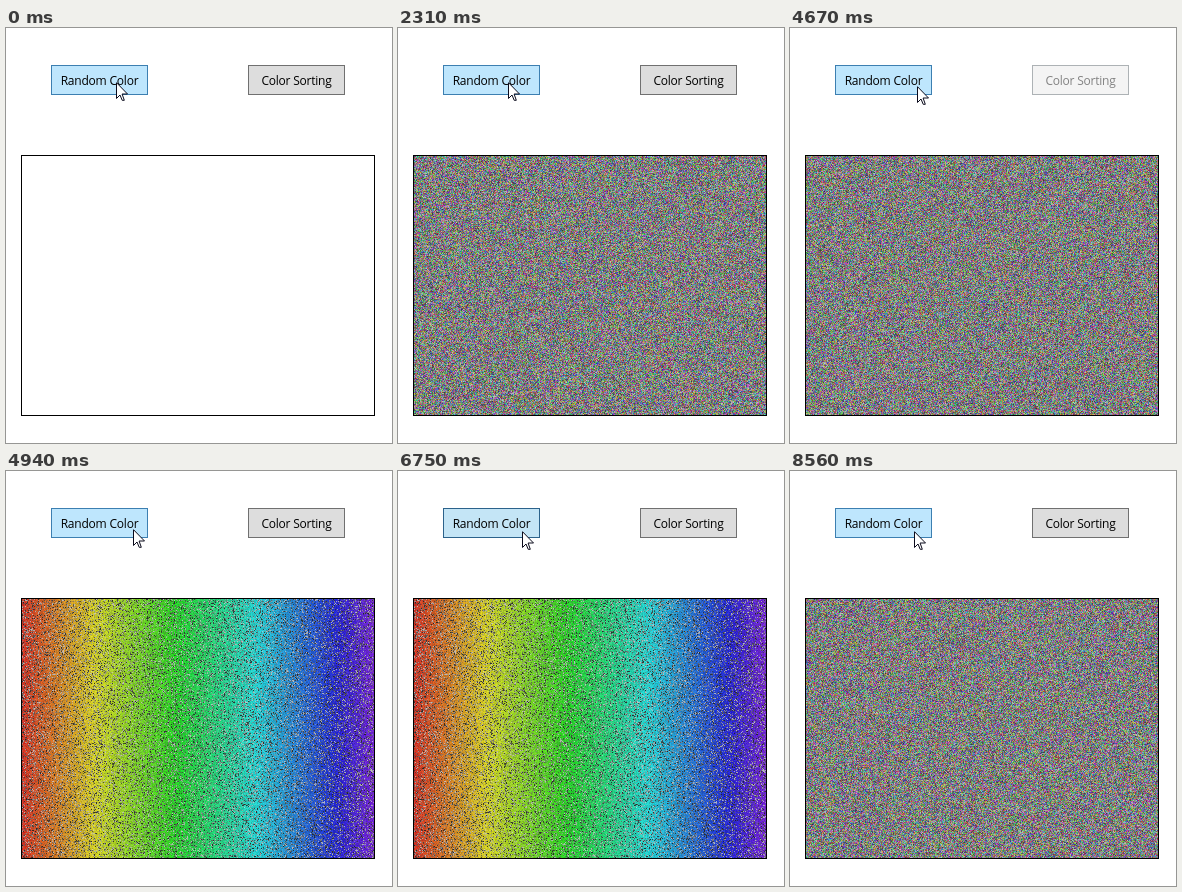
Animation, 386 px wide and 415 px high, one loop 9.09 s. Source, as an HTML page with a canvas:

```html
<!DOCTYPE html>
<html lang="en">
<head>
<meta charset="utf-8">
<title>Color sorting</title>
<style>
  html, body { margin: 0; width: 100%; height: 100%; overflow: hidden; background: #fff; }
  .stage { position: relative; width: 386px; height: 415px; overflow: hidden; }
  .stage > * { position: absolute; box-sizing: border-box; }
  .button {
    top: 37px; width: 97px; height: 30px;
    border: 1px solid #707070; background: #ddd; color: #000;
    font: 12px/29px "Open Sans", "Noto Sans", sans-serif; letter-spacing: -.22px;
    text-align: center; white-space: nowrap;
  }
  .hover { background: #bee6fd; border-color: #3c7fb1; }
  .pressed { background: #c4e5f6; border-color: #2c628b; }
  .disabled { background: #f4f4f4; border-color: #adb2b5; color: #838383; }
  #random { left: 45px; }
  #sort { left: 242px; }
  .frame { left: 15px; top: 127px; width: 354px; height: 261px; border: 1px solid #000; }
  canvas { left: 16px; top: 128px; }
  #pointer { left: 0; top: 0; width: 14px; height: 21px; }
</style>
</head>
<body>
<div class="stage">
  <div class="button" id="random">Random Color</div>
  <div class="button" id="sort">Color Sorting</div>
  <div class="frame"></div>
  <canvas id="picture" width="352" height="259"></canvas>
  <svg id="pointer" viewBox="0 0 14 21">
    <path d="M.5.7v15.8L4 13l2.2 5.3h2.1L6.1 12h5.4z" fill="#fff" stroke="#0b0b1c"/>
  </svg>
</div>
<script>
const LOOP = 9090;
const $ = id => document.getElementById(id);
const canvas = $('picture'), ctx = canvas.getContext('2d');

// Each row: start time, blank, sorted or a noise seed
const pictureSteps = [[0, 'blank'], [1050, 11], [2310, 23], [3460, 37],
  [4940, 'sorted'], [7430, 53], [8560, 71]];

// Each row: press, start of work, end of work
const clicks = {
  random: [[330, 460, 1050], [1640, 1710, 2310], [2700, 2770, 3460],
    [6690, 6820, 7430], [7830, 7970, 8560]],
  sort: [[3860, 3990, 4940]]
};

// Each row: first step, last step, step count, goal
const moves = [
  [2970, 3240, 5, 274, 53],
  [4190, 4670, 7, 127, 58],
  [5400, 5810, 6, 304, 57],
  [6070, 6600, 8, 124, 60]
];
const home = [110, 54];

function seeded(seed) {
  return () => {
    seed = (seed + 0x6D2B79F5) | 0;
    let n = Math.imul(seed ^ (seed >>> 15), 1 | seed);
    n = (n + Math.imul(n ^ (n >>> 7), 61 | n)) ^ n;
    return ((n ^ (n >>> 14)) >>> 0) / 4294967296;
  };
}

function hsl(hue, sat, light) {
  const reach = sat * Math.min(light, 1 - light);
  return [0, 8, 4].map(n => {
    const k = (n + hue / 30) % 12;
    return 255 * (light - reach * Math.max(-1, Math.min(k - 3, 9 - k, 1)));
  });
}

function paint(colorAt) {
  const image = ctx.createImageData(canvas.width, canvas.height);
  for (let i = 0; i < image.data.length; i += 4) {
    image.data.set([...colorAt((i / 4) % canvas.width), 255], i);
  }
  return image;
}

function noise(seed) {
  const rnd = seeded(seed);
  const channel = () => 48 + rnd() * 156;
  return paint(() => [channel(), channel(), channel()]);
}

function sorted() {
  const rnd = seeded(5);
  const speckle = Array.from({ length: canvas.width }, () => 0.22 + rnd() * 0.22);
  return paint(x => {
    const hue = 5 + 263 * x / canvas.width + (rnd() - 0.5) * 8;
    return rnd() < speckle[x]
      ? hsl(hue, rnd() * 0.35, 0.15 + rnd() * 0.6)
      : hsl(hue, 0.6 + rnd() * 0.2, 0.42 + rnd() * 0.12);
  });
}

const images = {};
for (const [, name] of pictureSteps) {
  images[name] = name === 'blank' ? paint(() => [255, 255, 255])
    : name === 'sorted' ? sorted() : noise(name);
}

function pointerAt(t) {
  let [x, y] = home;
  for (const [from, to, count, goalX, goalY] of moves) {
    if (t < from) break;
    const step = Math.min(count, 1 + Math.floor((t - from) * (count - 1) / (to - from) + 1e-6));
    const p = step / count, ease = p * p * (3 - 2 * p);
    x += (goalX - x) * ease;
    y += (goalY - y) * ease;
  }
  return [Math.round(x), Math.round(y)];
}

function buttonState(id, t, [x, y]) {
  for (const [press, work, done] of clicks[id]) {
    if (t >= press && t < done) return t < work ? 'pressed' : 'disabled';
  }
  const left = id === 'random' ? 45 : 242;
  return x >= left && x < left + 97 && y >= 37 && y < 67 ? 'hover' : '';
}

let shown;
function render(t) {
  const name = pictureSteps.filter(([from]) => from <= t).pop()[1];
  if (name !== shown) ctx.putImageData(images[shown = name], 0, 0);
  const spot = pointerAt(t);
  $('pointer').style.transform = `translate(${spot[0]}px, ${spot[1]}px)`;
  for (const id in clicks) $(id).className = 'button ' + buttonState(id, t, spot);
}

const start = performance.now();
function tick() {
  render((performance.now() - start) % LOOP);
  requestAnimationFrame(tick);
}
tick();
</script>
</body>
</html>
```
